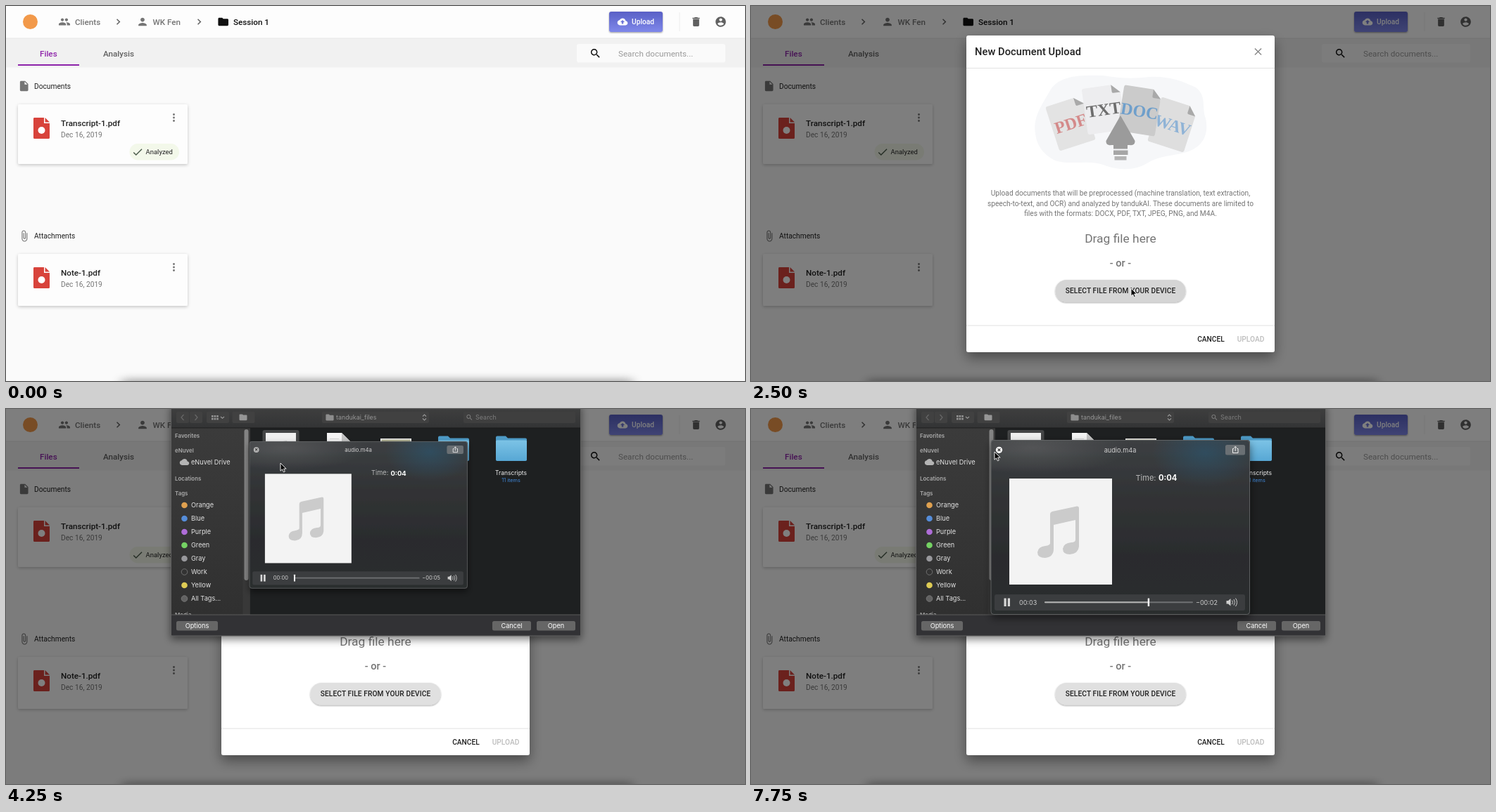
An HTML page that plays this animation: 1050x534 px, repeating every 8000 ms.

```html
<!DOCTYPE html>
<html lang="en">
<head>
<meta charset="utf-8">
<title>Document upload</title>
<style>
html,body{margin:0;width:100%;height:100%;overflow:hidden;background:#fafafa}
svg{display:block;width:1050px;height:534px;font-family:Roboto,sans-serif}
.mac{font-family:Inter,sans-serif}
.serif{font-family:"Liberation Serif",serif;font-weight:700}
text{white-space:pre}
</style>
</head>
<body>
<svg id="stage" viewBox="0 0 1050 534" xmlns="http://www.w3.org/2000/svg"></svg>
<script>
const icons = {
  group: 'M16 11c1.66 0 2.99-1.34 2.99-3S17.66 5 16 5c-1.66 0-3 1.34-3 3s1.34 3 3 3zm-8 0c1.66 0 2.99-1.34 2.99-3S9.66 5 8 5C6.34 5 5 6.34 5 8s1.34 3 3 3zm0 2c-2.33 0-7 1.17-7 3.5V19h14v-2.5c0-2.33-4.67-3.5-7-3.5zm8 0c-.29 0-.62.02-.97.05 1.16.84 1.97 1.97 1.97 3.45V19h6v-2.5c0-2.33-4.67-3.5-7-3.5z',
  person: 'M12 12c2.21 0 4-1.79 4-4s-1.79-4-4-4-4 1.79-4 4 1.79 4 4 4zm0 2c-2.67 0-8 1.34-8 4v2h16v-2c0-2.66-5.33-4-8-4z',
  folder: 'M10 4H4c-1.1 0-1.99.9-1.99 2L2 18c0 1.1.9 2 2 2h16c1.1 0 2-.9 2-2V8c0-1.1-.9-2-2-2h-8l-2-2z',
  chevron: 'M10 6L8.59 7.41 13.17 12l-4.58 4.59L10 18l6-6z',
  cloudUp: 'M19.35 10.04C18.67 6.59 15.64 4 12 4 9.11 4 6.6 5.64 5.35 8.04 2.34 8.36 0 10.91 0 14c0 3.31 2.69 6 6 6h13c2.76 0 5-2.24 5-5 0-2.64-2.05-4.78-4.65-4.96zM14 13v4h-4v-4H7l5-5 5 5h-3z',
  cloud: 'M19.35 10.04C18.67 6.59 15.64 4 12 4 9.11 4 6.6 5.64 5.35 8.04 2.34 8.36 0 10.91 0 14c0 3.31 2.69 6 6 6h13c2.76 0 5-2.24 5-5 0-2.64-2.05-4.78-4.65-4.96z',
  trash: 'M6 19c0 1.1.9 2 2 2h8c1.1 0 2-.9 2-2V7H6v12zM19 4h-3.5l-1-1h-5l-1 1H5v2h14V4z',
  account: 'M12 2C6.48 2 2 6.48 2 12s4.48 10 10 10 10-4.48 10-10S17.52 2 12 2zm0 3c1.66 0 3 1.34 3 3s-1.34 3-3 3-3-1.34-3-3 1.34-3 3-3zm0 14.2c-2.5 0-4.71-1.28-6-3.22.03-1.99 4-3.08 6-3.08 1.99 0 5.97 1.09 6 3.08-1.29 1.94-3.5 3.22-6 3.22z',
  search: 'M15.5 14h-.79l-.28-.27C15.41 12.59 16 11.11 16 9.5 16 5.91 13.09 3 9.5 3S3 5.91 3 9.5 5.91 16 9.5 16c1.61 0 3.09-.59 4.23-1.57l.27.28v.79l5 4.99L20.49 19l-4.99-5zm-6 0C7.01 14 5 11.99 5 9.5S7.01 5 9.5 5 14 7.01 14 9.5 11.99 14 9.5 14z',
  file: 'M6 2c-1.1 0-1.99.9-1.99 2L4 20c0 1.1.89 2 1.99 2H18c1.1 0 2-.9 2-2V8l-6-6H6zm7 7V3.5L18.5 9H13z',
  clip: 'M16.5 6v11.5c0 2.21-1.79 4-4 4s-4-1.79-4-4V5c0-1.38 1.12-2.5 2.5-2.5s2.5 1.12 2.5 2.5v10.5c0 .55-.45 1-1 1s-1-.45-1-1V6H10v9.5c0 1.38 1.12 2.5 2.5 2.5s2.5-1.12 2.5-2.5V5c0-2.21-1.79-4-4-4S7 2.79 7 5v12.5c0 3.04 2.46 5.5 5.5 5.5s5.5-2.46 5.5-5.5V6h-1.5z',
  check: 'M9 16.17L4.83 12l-1.42 1.41L9 19 21 7l-1.41-1.41z',
  close: 'M19 6.41L17.59 5 12 10.59 6.41 5 5 6.41 10.59 12 5 17.59 6.41 19 12 13.41 17.59 19 19 17.59 13.41 12z'
};

const icon = (name, cx, cy, fill = '#757575', k = .729) =>
  `<path d="${icons[name]}" fill="${fill}" transform="translate(${cx} ${cy}) scale(${k}) translate(-12 -12)"/>`;
const rect = (x, y, x2, y2, fill, r = 0, more = '') =>
  `<rect x="${x}" y="${y}" width="${x2 - x}" height="${y2 - y}" rx="${r}" fill="${fill}" ${more}/>`;
const circle = (x, y, r, fill, more = '') => `<circle cx="${x}" cy="${y}" r="${r}" fill="${fill}" ${more}/>`;
const path = (d, fill, more = '') => `<path d="${d}" fill="${fill}" ${more}/>`;
const line = (d, stroke, w = 1) => `<path d="${d}" fill="none" stroke="${stroke}" stroke-width="${w}"/>`;
// y is the middle of the capitals
const text = (x, y, s, size, fill, weight = 400, more = '') =>
  `<text x="${x}" y="${+(y + size * .355).toFixed(2)}" font-size="${size}" fill="${fill}" font-weight="${weight}" ${more}>${s}</text>`;
const mid = 'text-anchor="middle"';
const group = (id, body, more = '') => `<g id="${id}" ${more}>${body}</g>`;
const grad = (id, stops, dir = 'x2="0" y2="1"') =>
  `<linearGradient id="${id}" ${dir}>${stops.map((c, i) =>
    `<stop offset="${i / (stops.length - 1)}" stop-color="${c}"/>`).join('')}</linearGradient>`;
const shadow = (id, dy, blur, alpha) =>
  `<filter id="${id}" x="-20%" y="-30%" width="140%" height="170%"><feDropShadow dx="0" dy="${dy}" stdDeviation="${blur}" flood-opacity="${alpha}"/></filter>`;

const defs = `<defs>
${grad('btn', ['#5960c6', '#7f88ea'])}
${grad('bar', ['#414141', '#333435'])}
${grad('side', ['#373839', '#4b4b4b', '#575757', '#414142'], 'x2="1" y2="1"')}
${grad('sideDim', ['#3b3b3b', '#363636', '#303030'])}
${grad('blueFolder', ['#7cc3e6', '#57a7d4'])}
${grad('glass', ['#3c3f42', '#313335', '#2b2c2e', '#2c2d2f'])}
<radialGradient id="teal"><stop stop-color="#2c536b" stop-opacity=".7"/><stop offset="1" stop-color="#2c536b" stop-opacity="0"/></radialGradient>
<radialGradient id="haze"><stop stop-color="#777" stop-opacity=".4"/><stop offset="1" stop-color="#777" stop-opacity="0"/></radialGradient>
${shadow('card', 1.5, 2, .22)}${shadow('small', 1, 1, .4)}${shadow('menuSh', 3, 4, .35)}
${shadow('dlg', 8, 9, .4)}${shadow('sheet', 5, 6, .5)}
<filter id="soft" x="-10%" y="-300%" width="120%" height="700%"><feGaussianBlur stdDeviation="8 6"/></filter>
<clipPath id="glassClip"><rect x="341" y="44" width="368" height="249" rx="4"/></clipPath>
<clipPath id="sideClip"><rect x="234" y="27" width="113" height="266"/></clipPath>
</defs>`;

function card(y, h, name) {
  return rect(17, y, 258, y + h, '#fdfdfd', 2, 'filter="url(#card)"') +
    path(`M40 ${y + 19}h14v8h8v20.500q0 1.500 -1.500 1.500h-20q-1.500 0 -1.500 -1.500v-27q0 -1.500 1 -1.500z`, '#d8433b') +
    path(`M55.500 ${y + 19}l6.500 6.500h-6.500z`, '#d8433b') +
    circle(50.500, y + 37, 5, '#fff') +
    text(78, y + 27, name, 11.67, '#212121', 500) +
    text(78, y + 43, 'Dec 16, 2019', 10.2, '#757575') +
    [14.5, 19, 23.5].map(d => circle(238.5, y + d, 1.4, '#757575')).join('');
}

const page =
  rect(0, 0, 1050, 534, '#fafafa') + rect(0, 0, 1050, 46, '#fdfdfd') +
  rect(0, 46, 1050, 87.5, '#f1f1f1') + rect(0, 45.5, 1050, 46.5, '#e8e8e8') +
  circle(34.5, 22.5, 10.5, '#f2994a') +
  icon('group', 83, 22.5) + text(98, 22.5, 'Clients', 11.67, '#757575', 500) +
  icon('chevron', 159.5, 22.5, '#616161') +
  icon('person', 194, 22.5) + text(208.5, 22.5, 'WK Fen', 11.67, '#757575', 500) +
  icon('chevron', 274.5, 22.5, '#616161') +
  icon('folder', 308.7, 22.5, '#111') + text(323, 22.5, 'Session 1', 11.67, '#111', 500) +
  rect(857, 8, 933, 37, 'url(#btn)', 3, 'filter="url(#small)"') +
  icon('cloudUp', 876, 22.5, '#fff', .61) + text(889, 22.8, 'Upload', 10.2, '#fff', 500) +
  rect(956.5, 9, 957.5, 36, '#ededed') +
  icon('trash', 980.5, 22.5, '#616161') + icon('account', 1015.5, 22.5, '#616161') +
  text(48, 67.7, 'Files', 11.67, '#8e24aa', 500) + text(138, 67.7, 'Analysis', 11.67, '#616161', 500) +
  rect(17, 83, 104, 85, '#8e24aa') +
  rect(811, 54, 1022, 80.5, '#fafafa', 3) + icon('search', 837.5, 67.5, '#111') +
  text(870, 67.7, 'Search documents...', 11.67, '#9a9a9a') +
  icon('file', 25.7, 114) + text(40, 114.3, 'Documents', 10.2, '#212121') +
  card(140, 85, 'Transcript-1.pdf') +
  rect(175.5, 196, 246, 219.5, '#f3f8ea', 11.7) + icon('check', 187, 208, '#4a5a4a') +
  text(198.5, 208, 'Analyzed', 9.5, '#212121') +
  icon('clip', 26, 327.5) + text(40, 327.5, 'Attachments', 10.2, '#212121') +
  card(353, 74, 'Note-1.pdf') +
  rect(165, 532, 890, 550, '#000', 0, 'opacity=".35" filter="url(#soft)"');

const menu =
  rect(832, 38, 957.5, 116.5, '#fff', 3, 'filter="url(#menuSh)"') +
  group('hover', rect(832, 43, 957.5, 76.5, '#ececec')) +
  icon('file', 852.7, 60) + text(873, 60, 'Document', 11.67, '#212121') +
  icon('clip', 853, 93.5) + text(873, 93.5, 'Attachment', 11.67, '#212121');

const tip = rect(727, 52, 821.5, 68, '#6b6b6b', 3) +
  text(774.3, 60, 'Files that will be analyzed', 7.29, '#fff', 500, mid);

// Sheet of paper with a folded corner, drawn around its centre
const paper = (x, y, turn, fill, label, color) =>
  `<g transform="translate(${x} ${y}) rotate(${turn})">` +
  path('M-24 -33H15L27 -21V30Q27 33 24 33H-24Q-27 33 -27 30V-30Q-27 -33 -24 -33Z', fill) +
  path('M15 -33L27 -21H17Q15 -21 15 -23Z', '#a9a9a9') +
  text(0, 0, label, 24, color, 700, mid + ' class="serif"') + '</g>';

const dialog =
  rect(0, 0, 1050, 534, '#000', 0, 'opacity=".5"') +
  rect(306, 42, 744, 493, '#fff', 3, 'filter="url(#dlg)"') +
  text(318, 65, 'New Document Upload', 14.58, '#212121', 500, 'letter-spacing=".1"') +
  icon('close', 720.5, 65, '#8a8a8a') +
  rect(306, 88, 744, 89, '#e2e2e2') + rect(306, 454.5, 744, 455.5, '#e2e2e2') +
  path('M404 182C400 158 414 140 424 122C436 98 470 98 500 99C530 104 545 103 565 101C590 99 612 106 632 116C648 128 640 145 646 160C650 178 646 198 622 207C600 214 585 212 566 222C545 236 520 234 500 226C480 218 450 228 430 219C414 210 406 198 404 182Z', '#f6f7f9') +
  paper(454, 167, -18, '#e3e3e3', 'PDF', '#d48a8a') +
  paper(599, 169, 18, '#dedede', 'WAV', '#8fb3d6') +
  paper(501, 147, -8, '#ededef', 'TXT', '#6d6d6d') +
  paper(552, 149, 9, '#cbcbcb', 'DOC', '#6f9fcb') +
  path('M525 156L545.500 192Q546 199 538 198H535V203.500H515V198H512Q504 199 504.500 192Z', '#9b9b9b') +
  rect(515, 205.5, 535.5, 212, '#a6a6a6') + rect(516.5, 214, 533.5, 219.5, '#b4b4b4') +
  ['Upload documents that will be preprocessed (machine translation, text extraction,',
   'speech-to-text, and OCR) and analyzed by tandukAI. These documents are limited to',
   'files with the formats: DOCX, PDF, TXT, JPEG, PNG, and M4A.']
    .map((s, i) => text(525, 266.3 + i * 14.6, s, 10.2, '#757575', 400, mid)).join('') +
  text(525, 330.5, 'Drag file here', 17.4, '#757575', 400, mid) +
  text(525, 366, '- or -', 14.58, '#757575', 500, mid) +
  rect(432.5, 390, 617.5, 421.5, '#e0e0e0', 15.7, 'id="pick" filter="url(#small)"') +
  text(525, 405.7, 'SELECT FILE FROM YOUR DEVICE', 10.2, '#212121', 500, mid + ' letter-spacing=".1"') +
  text(653.5, 474.3, 'CANCEL', 10.2, '#212121', 500, mid) +
  text(710, 474.3, 'UPLOAD', 10.2, '#bdbdbd', 500, mid);

function toolbar(on) {
  const bg = on ? '#676767' : '#414141', ink = on ? '#eee' : '#969696', faint = on ? '#8c8c8c' : '#686868';
  const dots = [0, 1, 2].map(c => [0, 1].map(r =>
    rect(292 + c * 3.6, 9 + r * 3.8, 294.6 + c * 3.6, 11.6 + r * 3.8, ink)).join('')).join('');
  return rect(242, 3.5, 260, 20, on ? '#4f4f4f' : bg, 2.5) + rect(261, 3.5, 279, 20, on ? '#4f4f4f' : bg, 2.5) +
    line('M252.500 8l-3.500 4l3.500 4M268.500 8l3.500 4l-3.500 4', faint, 1.2) +
    rect(285, 3.5, 317, 20, bg, 2.5) + dots + line('M305 11l2.500 2.300l2.500 -2.300', ink, 1.2) +
    rect(321.5, 3.5, 353.5, 20, bg, 2.5) + icon('folder', 337, 11.8, ink, .55) +
    rect(449, 3.5, 601, 20, bg, 2.5) + icon('folder', 460, 12, on ? '#6bbbe6' : '#8d8d8d', .56) +
    text(469, 12, 'tandukai_files', 8.9, ink) +
    line('M592 10.500l2.500 -2.500l2.500 2.500M592 13.500l2.500 2.500l2.500 -2.500', ink, 1.1) +
    rect(650, 3.5, 809, 20, on ? '#595959' : '#3f3f3f', 2.5) +
    icon('search', 658.5, 12, on ? '#bbb' : '#888', .45) +
    text(667, 12, 'Search', 9, on ? '#a8a8a8' : '#7c7c7c');
}

const tags = [['Orange', '#fbb254'], ['Blue', '#5b9cf5'], ['Purple', '#c377f3'], ['Green', '#7fec6b'],
  ['Gray', '#a9a9ae'], ['Work', 'none'], ['Yellow', '#fbe55a'], ['All Tags...', '#6a6a6a']];
const heads = [['Favorites', 38], ['eNuvel', 59], ['Locations', 99.5], ['Tags', 120.5], ['Media', 293.5]];
const sidebar = `<g clip-path="url(#sideClip)">` +
  heads.map(([s, y]) => text(240, y, s, 7.9, '#bdbdbd', 600)).join('') +
  icon('cloud', 253.5, 75.5, '#c9c9c9', .56) + text(263, 75.5, 'eNuvel Drive', 9.2, '#fff') +
  tags.map(([s, c], i) => circle(253.5, 137 + i * 19, 4.3, c, c === 'none' || i === 7 ? 'stroke="#8d8d8d" stroke-width=".8"' : '') +
    text(263, 137 + i * 19, s, 9.2, '#fff')).join('') + '</g>' +
  rect(336.5, 27, 346.5, 293, '#3a3a3a') + rect(338.5, 29, 344.5, 244, '#8f8f8f', 3);

// Music note pair, centred on 436,175
const note = path('M425 150Q425 147 428 146L463 138.500Q466 138 466 141V196Q465 206 453 207Q443 207 443 199Q444 191 455 190Q461 190 461 186V158L430 165V199Q430 211 418 212Q407 212 407 204Q408 196 418 195Q425 194 425 191Z', '#cbcbcb');
const noteAt = (x, y, k) => `<g transform="translate(${x} ${y}) scale(${k}) translate(-436 -175)">${note}</g>`;

const folder = x => path(`M${x - 22} 40.500q0 -2 2 -2h12l3 3h25q2 0 2 2v28q0 2 -2 2h-40q-2 0 -2 -2z`, '#4d9ac6') +
  rect(x - 22, 44.5, x + 22, 74, 'url(#blueFolder)', 2);
const label = (x, s, sub) => text(x, 90.5, s, 8.5, '#f0f0f0', 400, mid) +
  (sub ? text(x, 101.3, sub, 7.3, '#3f86d8', 400, mid) : '');

const files =
  group('sel', rect(364.5, 30, 416.5, 81.5, '#454647', 3) + rect(365.5, 84.5, 414.5, 96, '#1259c4', 2)) +
  rect(369, 34, 412, 77.5, '#f0f0f0') + noteAt(390.5, 55.5, .29) + label(390, 'audio.m4a', '00:05') +
  path('M456 34H477L489 46V78H456Z', '#f4f4f4') + path('M477 34L489 46H477Z', '#c4c4c4') +
  [42, 46, 50, 54, 58].map((y, i) => rect(460, y, i ? 485 : 473, y + .8, '#cfcfcf')).join('') +
  text(472.5, 72, 'PDF', 6.2, '#777', 600, mid) + label(472, 'Filipino_Transcript') +
  rect(532, 42, 576, 69.5, '#eee') + rect(533.5, 43.5, 574.5, 68, '#b5b598') +
  [48, 53, 58, 63].map(y => rect(537, y, 569, y + 1, '#8f9078')).join('') + label(553.5, 'note.jpeg', '300×168') +
  folder(636) + label(635.5, 'PDF', '6 items') + folder(718) + label(717.5, 'Transcripts', '11 items');

const button = (x, x2, s) => rect(x, 302, x2, 315.5, '#666', 2.5) + text((x + x2) / 2, 308.7, s, 9.2, '#fff', 400, mid);
const picker =
  rect(234, -8, 817, 323, '#323334', 3, 'filter="url(#sheet)"') + rect(234, -8, 817, 27, 'url(#bar)') +
  rect(347, 27, 817, 293, '#1e2021') +
  group('sideOn', rect(234, 27, 347, 293, 'url(#side)')) + group('sideOff', rect(234, 27, 347, 293, 'url(#sideDim)')) +
  group('barOn', toolbar(true)) + group('barOff', toolbar(false)) + group('places', sidebar) +
  group('files', files) +
  rect(234, 26.5, 817, 27.3, '#1a1a1a') + rect(234, 292.5, 817, 293.5, '#5b5b5b') +
  button(242, 301, 'Options') + button(691, 746, 'Cancel') + group('open', button(754, 809, 'Open')) +
  line('M234.500 0V323H816.500V0', '#626262', 1);

const preview =
  rect(341, 44, 709, 293, 'url(#glass)', 4, 'filter="url(#sheet)"') +
  `<g clip-path="url(#glassClip)"><ellipse cx="645" cy="62" rx="75" ry="50" fill="url(#teal)"/>` +
  `<ellipse cx="400" cy="55" rx="140" ry="38" fill="url(#haze)"/></g>` +
  rect(341, 44.5, 708.5, 292.5, 'none', 4, 'stroke="#6a6c6e" stroke-width=".8"') +
  circle(352.5, 58.3, 4.6, '#b9b9b9', 'id="shut"') + line('M350.600 56.400l3.800 3.800M354.400 56.400l-3.800 3.800', '#2b2b2b', 1.2) +
  text(524.5, 58.5, 'audio.m4a', 9.2, '#cfcfcf', 400, mid) +
  rect(674, 51, 702, 65.5, '#6a7074', 2.5) +
  line('M686 56.500h-1.500v6h7.500v-6h-1.500M688.200 60v-6.500M686.200 55.300l2 -2l2 2', '#f0f0f0', 1) +
  text(546.5, 97.7, 'Time:', 11, '#b9b9b9') + text(579, 97.7, '0:04', 11.2, '#fff', 700) +
  rect(367, 99, 513, 250, '#f3f3f3') + note +
  rect(346, 264, 702, 287, '#3b3d3f', 3) +
  rect(359.5, 269.5, 362.7, 281, '#d6d6d6') + rect(364.8, 269.5, 368, 281, '#d6d6d6') +
  text(381, 275.3, '', 9, '#cfcfcf', 400, 'id="gone"') + text(663, 275.3, '', 9, '#cfcfcf', 400, 'id="left" text-anchor="end"') +
  rect(417, 274.2, 628, 276.2, '#6f7173', 1) + rect(417, 274.2, 418, 276.2, '#b0b0b0', 1, 'id="played"') +
  rect(-1.2, 269.5, 1.2, 281, '#fff', .5, 'id="knob"') +
  path('M675.500 273h2.500l3.500 -3v10.500l-3.500 -3h-2.500z', '#cfcfcf') +
  line('M683.500 272.500q2 2.800 0 5.600M686 271q3 4.300 0 8.600M688.500 269.500q4 5.800 0 11.600', '#cfcfcf', 1);

const pointer = path('M0 0V11.200L2.600 8.800L4.400 12.800L6.300 12L4.600 8.100H8.100Z', '#000', 'stroke="#fff" stroke-width=".9" stroke-linejoin="round"');

const stage = document.getElementById('stage');
stage.innerHTML = defs + page + group('menu', menu) + group('tip', tip) + group('dialog', dialog) +
  group('picker', picker, 'class="mac"') + group('preview', preview, 'class="mac"') + group('pointer', pointer);

const el = id => document.getElementById(id);
const show = (id, on) => el(id).setAttribute('display', on ? 'inline' : 'none');
const set = (id, name, value) => el(id).setAttribute(name, value);

// Pointer stops: time, x, y
const stops = [[250, 914, 26], [500, 899, 25], [750, 899, 25], [1000, 896, 52], [1250, 895, 66],
  [1500, 708, 163], [2250, 541, 402], [2500, 540, 402], [2750, 522, 262], [3000, 482, 92],
  [3500, 390, 77], [6750, 390, 77], [7750, 346, 61]];

function pointerAt(t) {
  const i = stops.findIndex(s => s[0] > t);
  if (i < 0) return stops[stops.length - 1].slice(1);
  const [a, b] = [stops[Math.max(0, i - 1)], stops[i]];
  const k = i ? (t - a[0]) / (b[0] - a[0]) : 0;
  return [1, 2].map(n => a[n] + (b[n] - a[n]) * k);
}

function draw(t) {
  show('menu', t >= 750 && t < 1500);
  show('hover', t >= 1000);
  show('tip', t >= 1250 && t < 1500);
  show('dialog', t >= 1500);
  set('pick', 'fill', t >= 2250 && t < 3250 ? '#d5d5d5' : '#e0e0e0');

  const quick = t >= 4250;
  show('picker', t >= 2750);
  set('picker', 'transform', `translate(0 ${t < 3000 ? -150 : 0})`);
  show('barOn', !quick); show('barOff', quick);
  show('sideOn', !quick); show('sideOff', quick);
  set('places', 'opacity', quick ? .86 : 1);
  set('files', 'opacity', t < 3250 ? .55 : 1);
  show('sel', t >= 3750);
  set('open', 'opacity', t < 3750 ? .35 : 1);

  // The preview zooms in from the chosen file
  const k = t < 4500 ? .842 : 1;
  show('preview', quick);
  set('preview', 'transform', k < 1 ? `translate(346 46) scale(${k}) translate(-341 -44)` : '');
  const sec = Math.max(0, (t - 4350) / 1000), x = 417 + sec * 43.5;
  set('knob', 'transform', `translate(${x} 0)`);
  set('played', 'width', x - 417);
  el('gone').textContent = '00:0' + Math.floor(sec);
  el('left').textContent = '−00:0' + (5 - Math.floor(sec));
  set('shut', 'fill', t >= 7500 ? '#fff' : '#b9b9b9');

  show('pointer', t >= 250);
  set('pointer', 'transform', `translate(${pointerAt(t).join(' ')})`);
}

const start = performance.now();
function tick(now) {
  const t = Math.max(0, now - start) % 8000;
  draw(Math.floor(t / 250) * 250);
  requestAnimationFrame(tick);
}
draw(0);
requestAnimationFrame(tick);
</script>
</body>
</html>
```
